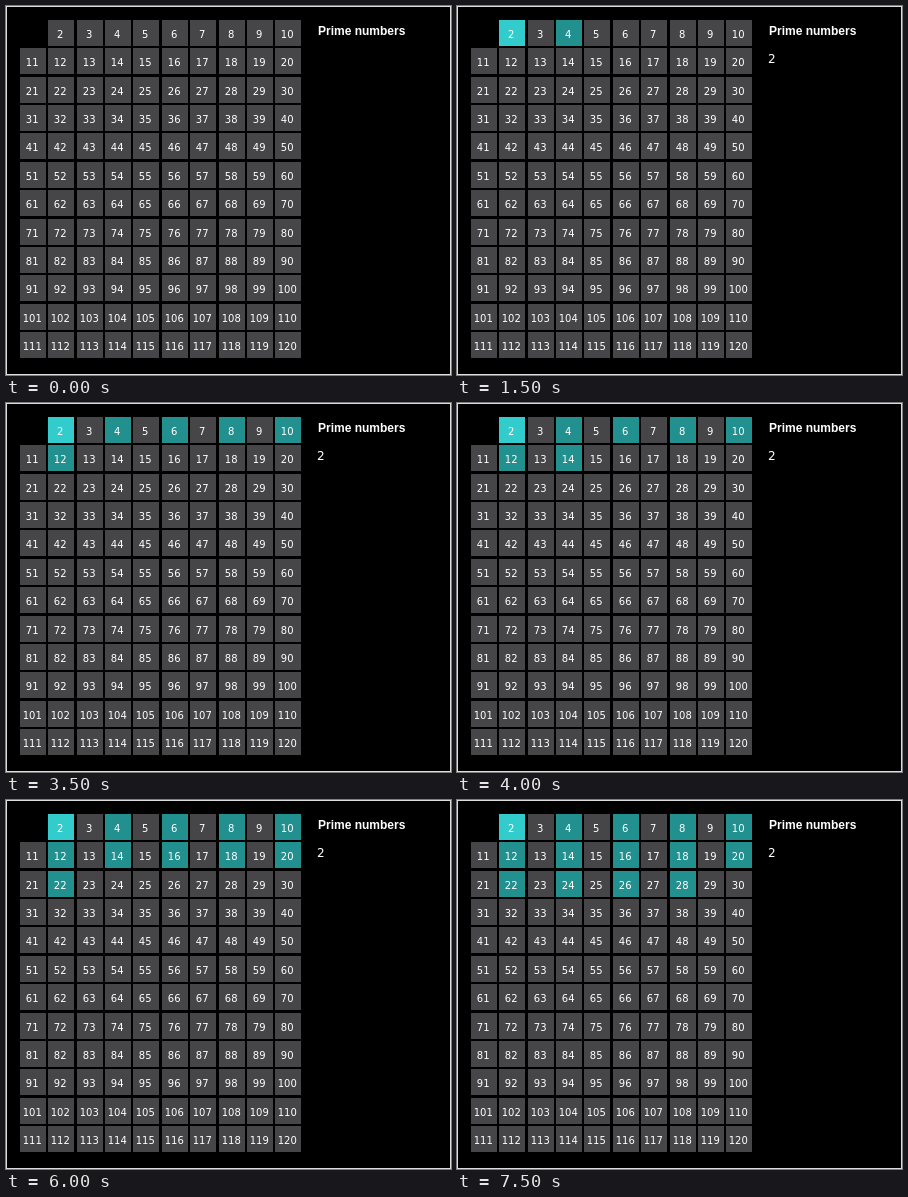
Write an HTML page with a canvas that moves like this. It is 445 px wide and 369 px high and loops after 8 s.

```html
<!DOCTYPE html>
<html lang="en">
<head>
<meta charset="utf-8">
<title>Prime sieve</title>
<style>
html, body { margin: 0; width: 100%; height: 100%; overflow: hidden; background: #000; }
canvas { display: block; }
</style>
</head>
<body>
<canvas id="stage" width="445" height="369"></canvas>
<script>
const ctx = document.getElementById("stage").getContext("2d");
const LOOP = 8000, STEP = 500;
const COLS = 10, LAST = 120, PITCH = 28.36, ORIGIN = 14, CELL = 26;
const PLAIN = "#464547", PRIME = "#33cccc", MULTIPLE = "#239090";

function text(label, x, y, font, align = "left") {
  ctx.font = font;
  ctx.textAlign = align;
  ctx.fillStyle = "#fff";
  ctx.fillText(label, x, y);
}

function cellColor(n, step) {
  if (n === 2) return step >= 1 ? PRIME : PLAIN;
  // One further multiple of two is struck per step, starting with 4 at step 3.
  return n % 2 === 0 && n / 2 <= step - 1 ? MULTIPLE : PLAIN;
}

function draw(time) {
  const step = Math.floor(time / STEP);
  ctx.fillStyle = "#000";
  ctx.fillRect(0, 0, 445, 369);
  ctx.strokeStyle = "#ddd";
  ctx.strokeRect(0.5, 0.5, 444, 368);

  for (let n = 2; n <= LAST; n++) {
    const x = Math.round(ORIGIN + (n - 1) % COLS * PITCH);
    const y = Math.round(ORIGIN + Math.floor((n - 1) / COLS) * PITCH);
    ctx.fillStyle = cellColor(n, step);
    ctx.fillRect(x, y, CELL, CELL);
    text(n, x + 12.2, y + 17.5, "10px 'DejaVu Sans', sans-serif", "center");
  }

  text("Prime numbers", 312, 28.5, "bold 12px 'Liberation Sans', Arial, sans-serif");
  if (step >= 1) text("2", 311, 57, "12px 'DejaVu Sans', sans-serif");
}

const start = performance.now();
function frame() {
  draw((performance.now() - start) % LOOP);
  requestAnimationFrame(frame);
}
frame();
</script>
</body>
</html>
```
